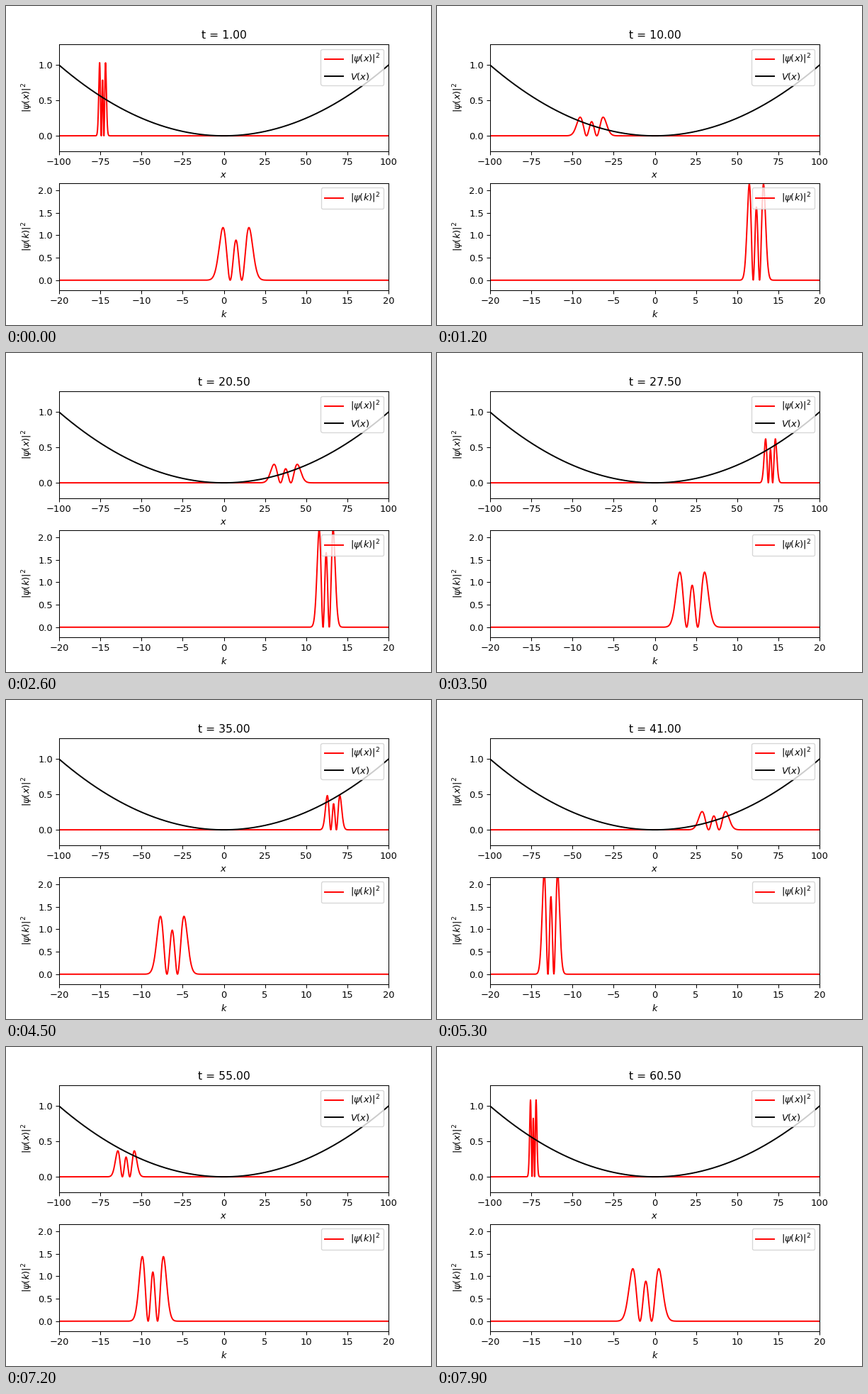
Write a matplotlib script that moves like this. It is 600 px wide and 450 px high and loops after 8 s.

```python
import numpy as np
import matplotlib.pyplot as plt
from matplotlib.animation import FuncAnimation

FRAMES, INTERVAL = 80, 100
MASS, STIFF = 1.9, 0.02
OMEGA = np.sqrt(STIFF / MASS)
MW = MASS * OMEGA
START = -74.0

N, DX = 2048, 0.1
x = DX * (np.arange(N) - N / 2)
k = 2 * np.pi / (N * DX) * (np.arange(N) - N / 2)


def density(u, centre, width):
    """Second Hermite state, shifted and scaled."""
    q = (u - centre) / width
    return np.sqrt(np.pi) / 8 * (4 * q**2 - 2) ** 2 * np.exp(-q**2) / width


def packets(t):
    """Densities in position and momentum space for a harmonic well."""
    c, s = np.cos(OMEGA * t), np.sin(OMEGA * t)
    px = density(x, START * c, np.hypot(c, s / MW))
    pk = density(k, -START * MW * s, np.hypot(c, s * MW))
    return px, pk


def time_at(frame):
    return 1 + 0.5 * np.ceil(1.5 * frame)


plt.rcParams["font.family"] = "DejaVu Sans"
fig, (ax_x, ax_k) = plt.subplots(2, 1, figsize=(6.4, 4.8), dpi=93.75)
fig.subplots_adjust(left=0.125, right=0.9, bottom=0.11, top=0.88, hspace=0.3)

peak = np.sqrt(density(k, 0, 1).max())


def setup(ax, name, half, top):
    ax.set_xlim(-half, half)
    ax.set_ylim(-0.2 * peak, top * peak)
    ax.set_xlabel(f"${name}$")
    ax.set_ylabel(rf"$|\psi({name})|^2$")
    return ax.plot([], [], c="r", label=rf"$|\psi({name})|^2$")[0]


line_x = setup(ax_x, "x", 100, 1.2)
line_k = setup(ax_k, "k", 20, 2.0)
ax_x.plot(x, STIFF / 2 * x**2 / 100, c="k", label="$V(x)$")
for ax in (ax_x, ax_k):
    ax.legend(loc="upper right")
title = ax_x.set_title("")


def update(frame):
    t = time_at(frame)
    px, pk = packets(t)
    line_x.set_data(x, px)
    line_k.set_data(k, pk)
    title.set_text(f"t = {t:.2f}")
    return line_x, line_k, title


anim = FuncAnimation(fig, update, frames=FRAMES, interval=INTERVAL,
                     repeat=True, repeat_delay=0, blit=False)
plt.show()
```
